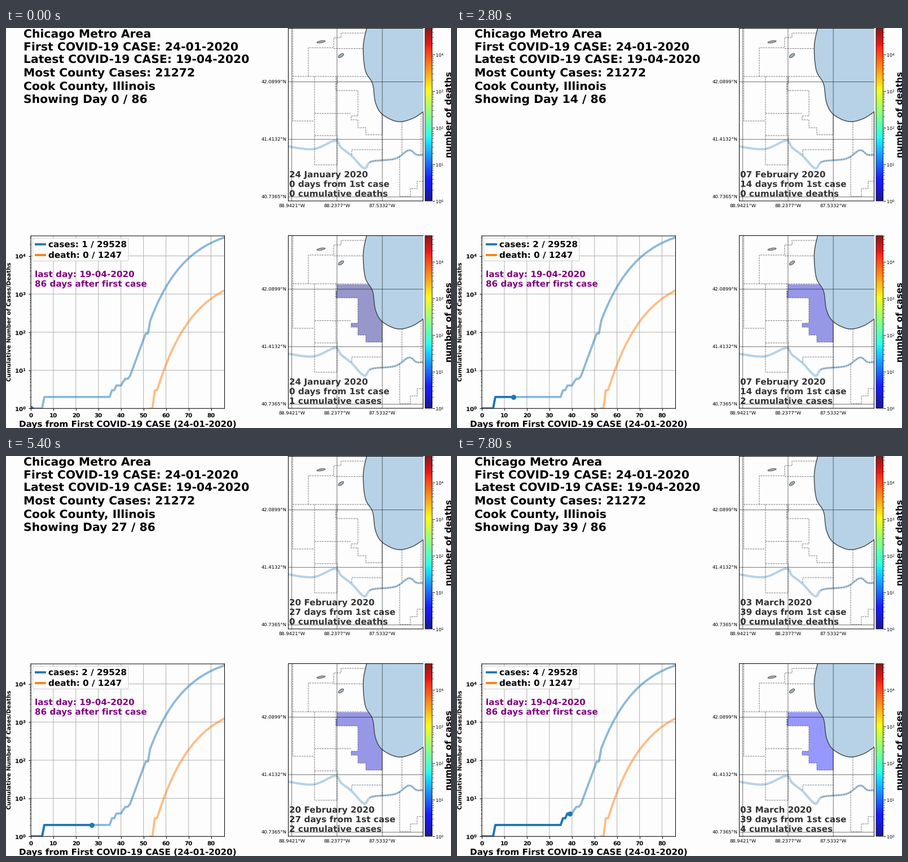
Recreate the animation shown at these times as a matplotlib script. Size 789x710 px, loop 8 s.

```python
import numpy as np
import matplotlib.pyplot as plt
from matplotlib import colormaps
from matplotlib.animation import FuncAnimation
from matplotlib.cm import ScalarMappable
from matplotlib.colors import ListedColormap, LogNorm
from matplotlib.patches import Ellipse, FancyBboxPatch, Polygon
from matplotlib.transforms import Affine2D

W, H, DPI = 789, 710, 72          # at 72 dpi one point is one pixel
UNIT = 1.2735
BIG, MID, SMALL, TINY = 16 * UNIT, 12 * UNIT, 8 * UNIT, 8.4
DAYS, SHOWN = 86, 40
BLUE, ORANGE, WATER = "#1f77b4", "#ff7f0e", "#b7d2e6"
NORM, JET = LogNorm(1, 51000), colormaps["jet"]

plt.rcParams.update({"font.family": "DejaVu Sans", "text.hinting": "none",
                     "path.snap": False})
fig = plt.figure(figsize=(W / DPI, H / DPI), dpi=DPI, facecolor="#fdfdfd")
px = Affine2D().scale(1 / W, -1 / H).translate(0, 1) + fig.transFigure


def label(x, y, text, size, weight="bold", **kw):
    return fig.text(x, y, text, transform=px, fontsize=size, weight=weight, **kw)


def upright(x, y, text, size):
    label(x, y, text, size, rotation=90, rotation_mode="anchor", ha="center")


def panel(x0, y0, x1, y1):
    ax = fig.add_axes([x0 / W, 1 - y1 / H, (x1 - x0) / W, (y1 - y0) / H])
    ax.set_facecolor("none")
    for side in ax.spines.values():
        side.set_linewidth(1)
    return ax


def decades(style):
    return [f"${style}{{10^{{{n}}}}}$" for n in range(5)]


def date_text(day):
    d = 24 + day
    for month, length in (("January", 31), ("February", 29), ("March", 31)):
        if d <= length:
            return f"{d:02d} {month} 2020"
        d -= length


def stairs(x, y, *moves):
    """Path of alternating horizontal and vertical moves."""
    path = [(x, y)]
    for i, step in enumerate(moves):
        x, y = (x, y + step) if i % 2 else (x + step, y)
        path.append((x, y))
    return path


def smooth(points, n=8):
    """Catmull-Rom curve through the points."""
    p = np.array([points[0], *points, points[-1]], float)
    t = np.linspace(0, 1, n, endpoint=False)[:, None]
    parts = [b + t * (c - a) / 2 + t**2 * (a - 2.5 * b + 2 * c - d / 2)
             + t**3 * (1.5 * (b - c) + (d - a) / 2)
             for a, b, c, d in zip(p, p[1:], p[2:], p[3:])]
    return np.vstack([*parts, p[-1:]])


# ---- daily totals: slow first steps, then growth levelling off
def levelling(day, top, gap, start):
    return 10 ** (top - gap * np.exp(-0.062 * (day - start)))


day = np.arange(DAYS + 1)
first_steps = 1 + np.searchsorted([6, 36, 38, 41, 42, 44], day, side="right")
rise = 7 * 10 ** (0.16 * (np.minimum(day, 51) - 44))
cases = np.select([day < 45, day < 53], [first_steps, rise],
                  levelling(day, 4.81, 3.02, 50))
deaths = np.select([day < 53, day < 55], [np.nan, 1],
                   np.maximum(3, levelling(day, 3.58, 2.43, 60)))

# ---- heading
HEADING = ["Chicago Metro Area", "First COVID-19 CASE: 24-01-2020",
           "Latest COVID-19 CASE: 19-04-2020", "Most County Cases: 21272",
           "Cook County, Illinois", ""]
heading = [label(31, 16.6 + 23.3 * i, s, BIG) for i, s in enumerate(HEADING)]

# ---- growth chart
chart = panel(44, 369, 387.5, 675.3)
chart.set_yscale("log")
chart.set_xlim(0, DAYS)
chart.set_ylim(1, 33500)
chart.grid(color="#b0b0b0", lw=1)
chart.set_axisbelow(True)
chart.set_xticks(range(0, 81, 10))
chart.set_yticks(10.0 ** np.arange(5), decades(r"\mathbf"))
chart.tick_params(length=4.4, width=1, pad=3.5, labelsize=SMALL)
chart.tick_params(which="minor", length=2.5, width=0.8)
for tick in chart.get_xticklabels():
    tick.set_weight("bold")
chart.plot(day, cases, color=BLUE, lw=3.8, alpha=0.5)
chart.plot(day, deaths, color=ORANGE, lw=3.8, alpha=0.5)
progress, = chart.plot([], [], color=BLUE, lw=3.8)
dot, = chart.plot([], [], "o", color=BLUE, ms=9, mew=0)
label(216, 707.5, "Days from First COVID-19 CASE (24-01-2020)", MID, ha="center")
upright(9, 521, "Cumulative Number of Cases/Deaths", SMALL)
label(51, 441.3, "last day: 19-04-2020", MID, color="purple")
label(51, 458.6, "86 days after first case", MID, color="purple")

chart.add_patch(FancyBboxPatch(
    (50, 375.5), 164.5, 35.5, boxstyle="round,pad=2.5", transform=px,
    fc=(1, 1, 1, 0.8), ec="#cccccc", lw=1, zorder=4))
for y, color in ((384, BLUE), (403, ORANGE)):
    chart.plot([51, 71], [y, y], color=color, lw=3.8, transform=px, zorder=5,
               solid_capstyle="butt")
case_key = label(75.5, 388.8, "", MID)
death_key = label(75.5, 407.5, "", MID)

# ---- map outlines, in pixels of the upper map
LAKE = smooth([(640, -2), (633.5, 32), (637, 75), (650, 99), (655, 132),
               (667, 153), (694, 166), (720, 161), (742, 147)])
RIVER = smooth([(499, 210), (545, 215), (583, 200), (594, 212), (613, 227),
                (635, 249), (648, 237), (690, 232), (714, 217), (728, 225),
                (742, 225)])
COOK = stairs(642, 87, 25, 102.5, -29, -12.5, -14, -14, -12, -7, 12, -45, -39,
              -12, 2.5, -12)
BORDERS = [
    COOK,
    stairs(508.5, 0, 0, 165, 38),
    stairs(508, 86, 134),
    stairs(536, 86, 0, -51, 45, -18, 13, -8, 44),
    stairs(581, 36.5, 53),
    stairs(547, 86, 0, 157, 40, -53),
    stairs(547, 151.5, 64),
    stairs(547, 191, 38, -105),
    stairs(667, 153, 0, 82),
    stairs(613, 225, 0, -9, 54),
    stairs(702, 166, 0, 58),
    stairs(736, 151, 0, 75),
    stairs(698, 228, 0, 71, 19, -14, 12, -13, 12),
    RIVER[RIVER[:, 0] > 645],
]


def draw_map(dy, what):
    ax = panel(500.5, 0.5 + dy, 739.5, 307 + dy)
    ax.set_xlim(500.5, 739.5)
    ax.set_ylim(307, 0.5)
    ax.set_xticks([])
    ax.set_yticks([])
    county = ax.add_patch(Polygon(COOK, fc="none", ec="none", zorder=1))
    ax.plot(*RIVER.T, color=WATER, lw=4, zorder=2)
    for line in BORDERS:
        ax.plot(*zip(*line), color="#3c3c44", lw=0.9, alpha=0.75,
                ls=(0, (3.4, 1.5)), zorder=2.5)
    ax.add_patch(Polygon([*LAKE, (742, -2)], fc=WATER, ec="#404448", lw=1.4,
                         zorder=3))
    for centre, wide, high, tilt in (((558.5, 24.5), 15, 3.6, -10),
                                     ((594, 49), 11, 5, -35)):
        ax.add_patch(Ellipse(centre, wide, high, angle=tilt, fc="#9fb0bc",
                             ec="#55595c", lw=1, zorder=3))
    for i in range(3):
        x, y = 506.6 + 80.3 * i, 95.6 + 102.1 * i
        ax.axvline(x, color="k", lw=1, alpha=0.55, zorder=5)
        ax.axhline(y, color="k", lw=1, alpha=0.55, zorder=5)
        label(x, 319 + dy, f"{88.9421 - 0.70445 * i:.4f}°W", TINY, "normal",
              ha="center")
        label(498, y + 3 + dy, f"{42.0899 - 0.6767 * i:.4f}°N", TINY, "normal",
              ha="right")

    shades = 1 - 0.9 * (1 - JET(np.linspace(0, 1, 256))[:, :3])
    bar = fig.colorbar(ScalarMappable(NORM, ListedColormap(shades)),
                       cax=panel(743, 0.5 + dy, 755.5, 307 + dy))
    bar.set_ticks(10.0 ** np.arange(5), labels=decades(""))
    bar.ax.tick_params(length=3.5, pad=2, width=0.9, labelsize=7.9)
    bar.ax.tick_params(which="minor", length=2, width=0.7)
    upright(789.5, 154 + dy, "number of " + what, MID)
    notes = [label(502.5, y + dy, "", MID, color="k", alpha=0.8)
             for y in (264.3, 281.3, 298.4)]
    return county, notes


_, death_notes = draw_map(0, "deaths")
cook, case_notes = draw_map(368, "cases")


def update(now):
    count = round(cases[now])
    heading[-1].set_text(f"Showing Day {now} / {DAYS}")
    progress.set_data(day[:now + 1], cases[:now + 1])
    dot.set_data([now], [cases[now]])
    case_key.set_text(f"cases: {count} / 29528")
    death_key.set_text("death: 0 / 1247")
    cook.set_facecolor(JET(NORM(count), alpha=0.4))
    for notes, total in ((death_notes, "0 cumulative deaths"),
                         (case_notes, f"{count} cumulative cases")):
        lines = (date_text(now), f"{now} days from 1st case", total)
        for note, line in zip(notes, lines):
            note.set_text(line)


anim = FuncAnimation(fig, update, frames=SHOWN, interval=200, repeat=True,
                     repeat_delay=0, init_func=lambda: update(0))
plt.show()
```
